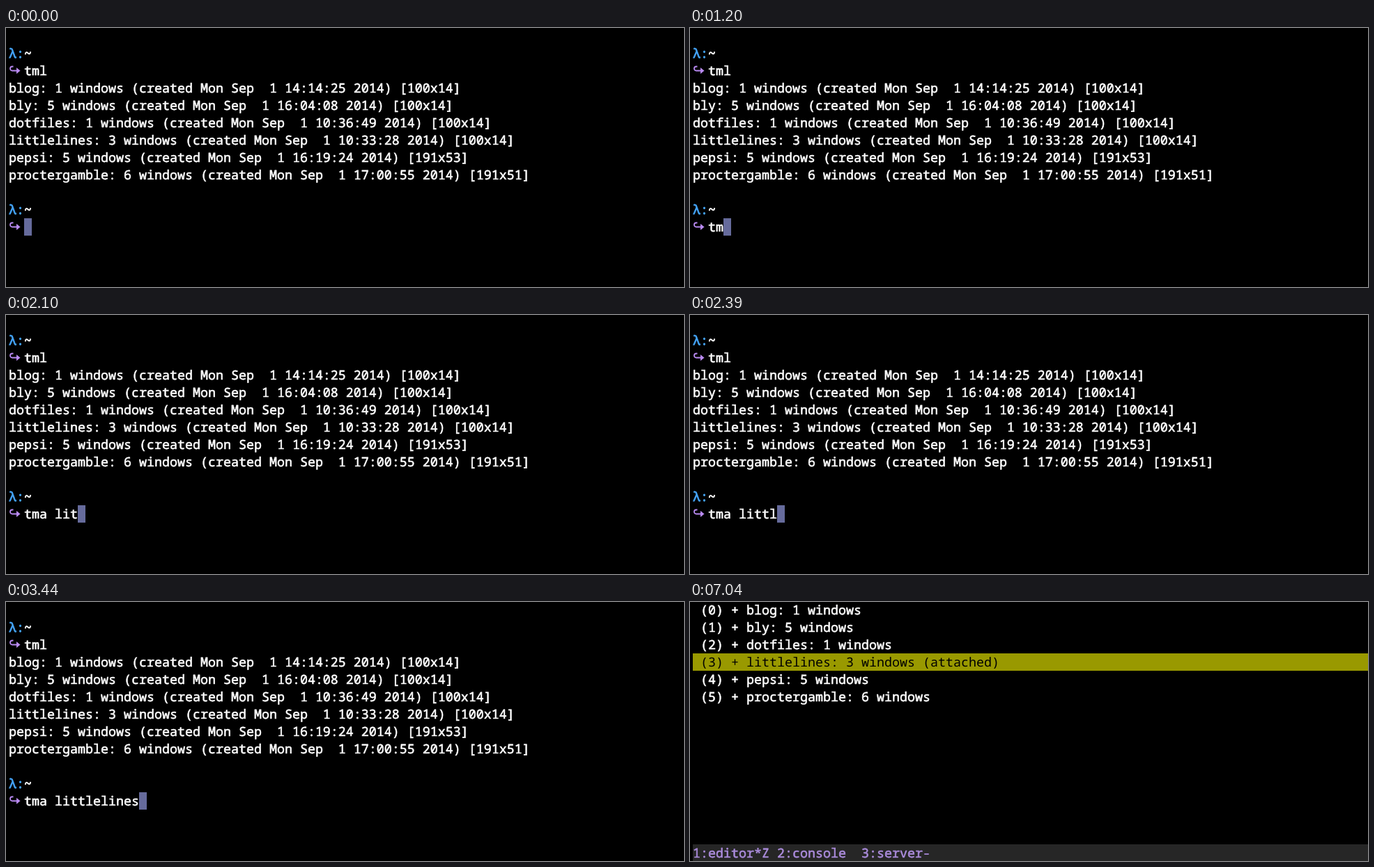
Write an HTML page that moves like this. It is 973x373 px and loops after 8000 ms.

```html
<!DOCTYPE html>
<html lang="en">
<head>
<meta charset="utf-8">
<title>Terminal session</title>
<style>
  html, body { margin: 0; width: 100%; height: 100%; overflow: hidden; background: #000; }
  svg { display: block; width: 973px; height: 373px; }
  text {
    font: 400 18.3333px "Noto Sans Mono", "DejaVu Sans Mono", monospace;
    font-variant-ligatures: none;
    text-rendering: geometricPrecision;
    white-space: pre;
  }
</style>
</head>
<body>
<svg id="stage" viewBox="0 0 973 373" xmlns="http://www.w3.org/2000/svg">
  <rect width="973" height="373" fill="#000"/>
  <g id="shell"></g>
  <g id="editor"></g>
  <g id="sessions"></g>
  <g id="status"></g>
</svg>
<script>
const NS = 'http://www.w3.org/2000/svg';
const LOOP = 8000, EDITOR_AT = 4040, SESSIONS_AT = 7040;
const CELL = 11, LINE = 25;
const C = {
  white: '#fff', blue: '#44a3f7', purple: '#b98af2', cursor: '#666b9c',
  comment: '#adadad', red: '#ee7272', yellow: '#ffd580', paren: '#7479b3',
  green: '#8fd66b', border: '#3a2a9a', bar: '#262626', dim: '#686868',
  status: '#ab8cdc', olive: '#999900'
};
const layers = {};
for (const id of ['shell', 'editor', 'sessions', 'status']) layers[id] = document.getElementById(id);

const colX = col => 4 + col * CELL;
const rowY = row => row * LINE - 1;

function add(parent, tag, attrs, content = '') {
  const el = document.createElementNS(NS, tag);
  for (const key in attrs) el.setAttribute(key, attrs[key]);
  el.textContent = content;
  parent.appendChild(el);
  return el;
}

const rect = (g, x, y, width, height, fill) => add(g, 'rect', { x, y, width, height, fill });
const block = (g, col, row) => rect(g, colX(col), rowY(row), CELL, LINE, C.cursor);
const band = (g, row, fill) => rect(g, 4, rowY(row), 969, LINE, fill);

// A thin outline gives the text its medium weight.
function write(g, col, row, content, fill = C.white, outline = 0.6) {
  return add(g, 'text', {
    x: colX(col), y: rowY(row) + 19, fill, stroke: fill, 'stroke-width': outline
  }, content);
}

// Writes [text, colour] pairs one after another on a row.
function writeParts(g, col, row, parts) {
  for (const [content, fill] of parts) {
    write(g, col, row, content, fill);
    col += content.length;
  }
}

function prompt(g, row) {
  write(g, 0, row, 'λ:', C.blue, 0.9);
  write(g, 2, row, '~', C.white, 0.9);
  const transform = `translate(0 ${rowY(row + 1)})`;
  add(g, 'path', {
    d: 'M10.5 6.5H9a3 3 0 0 0 0 6H17', transform,
    fill: 'none', stroke: C.purple, 'stroke-width': 1.8
  });
  add(g, 'path', { d: 'M15 8L20.5 12.5L15 17Z', transform, fill: C.purple });
}

const list = [
  ['blog', 1, '14:14:25', '100x14'],
  ['bly', 5, '16:04:08', '100x14'],
  ['dotfiles', 1, '10:36:49', '100x14'],
  ['littlelines', 3, '10:33:28', '100x14'],
  ['pepsi', 5, '16:19:24', '191x53'],
  ['proctergamble', 6, '17:00:55', '191x51']
];

// Shell
prompt(layers.shell, 1);
write(layers.shell, 2, 2, 'tml');
list.forEach(([name, count, time, size], i) =>
  write(layers.shell, 0, 3 + i, `${name}: ${count} windows (created Mon Sep  1 ${time} 2014) [${size}]`));
prompt(layers.shell, 10);
const typed = write(layers.shell, 2, 11, '');
const caret = block(layers.shell, 2, 11);

// Editor
const ed = layers.editor;
write(ed, 3, 0, 'end', C.red);
[
  "# Public: Extract 'real' title from the article title since it may include",
  '# the author name since middleman does not support article.authors',
  '#',
  '# Returns the String article title'
].forEach((line, i) => write(ed, 3, 2 + i, line, C.comment));
writeParts(ed, 3, 6, [
  ['def ', C.red], ['extract_title', C.yellow], ['(', C.paren], ['title', C.white], [')', C.paren]
]);
writeParts(ed, 5, 7, [
  ['title.split', C.white], ['(', C.paren], ['"|"', C.green], [')[', C.paren],
  ['1..-1', C.white], [']', C.paren], ['.join', C.white], ['(', C.paren],
  ["''", C.green], [')', C.paren], ['.chomp.strip', C.white]
]);
write(ed, 3, 8, 'end', C.red);
write(ed, 3, 11, "# Public: Link helper that adds 'current' class if on the current page", C.comment);
for (let row = 0; row < 12; row++) {
  if (row !== 10) rect(ed, 899.5, rowY(row) + 4, 2, 15, C.border);
}
rect(ed, colX(81), 244, CELL, 2, C.border);
rect(ed, colX(82), 244, 67, 2, C.white);
rect(ed, colX(1), 244, CELL, 2, C.white);
block(ed, 1, 10);
band(ed, 12, C.bar);
write(ed, 1, 12, 'L66', C.dim);
write(ed, 45, 12, 'config.rb', C.dim);

// Session chooser
list.forEach(([name, count], i) => {
  const active = name === 'littlelines';
  if (active) band(layers.sessions, i, C.olive);
  write(layers.sessions, 1, i, `(${i}) + ${name}: ${count} windows${active ? ' (attached)' : ''}`,
    active ? '#000' : C.white, active ? 0 : 0.6);
});

// Status line
band(layers.status, 14, C.bar);
write(layers.status, 0, 14, '1:editor*Z 2:console  3:server-', C.status);

// Each step is [time, characters typed so far].
const command = 'tma littlelines';
const steps = [
  [600, 1], [1200, 2], [1500, 4], [1800, 5], [1950, 6], [2100, 7], [2250, 8],
  [2390, 9], [2690, 10], [2840, 11], [2990, 13], [3140, 14], [3440, 15]
];

const show = (g, on) => g.setAttribute('visibility', on ? 'visible' : 'hidden');

function draw(t) {
  let count = 0;
  for (const [at, n] of steps) if (t >= at) count = n;
  typed.textContent = command.slice(0, count);
  caret.setAttribute('x', colX(2 + count));
  show(layers.shell, t < EDITOR_AT);
  show(layers.editor, t >= EDITOR_AT && t < SESSIONS_AT);
  show(layers.sessions, t >= SESSIONS_AT);
  show(layers.status, t >= EDITOR_AT);
}

const start = performance.now();
function tick() {
  draw((performance.now() - start) % LOOP);
  requestAnimationFrame(tick);
}
tick();
</script>
</body>
</html>
```
